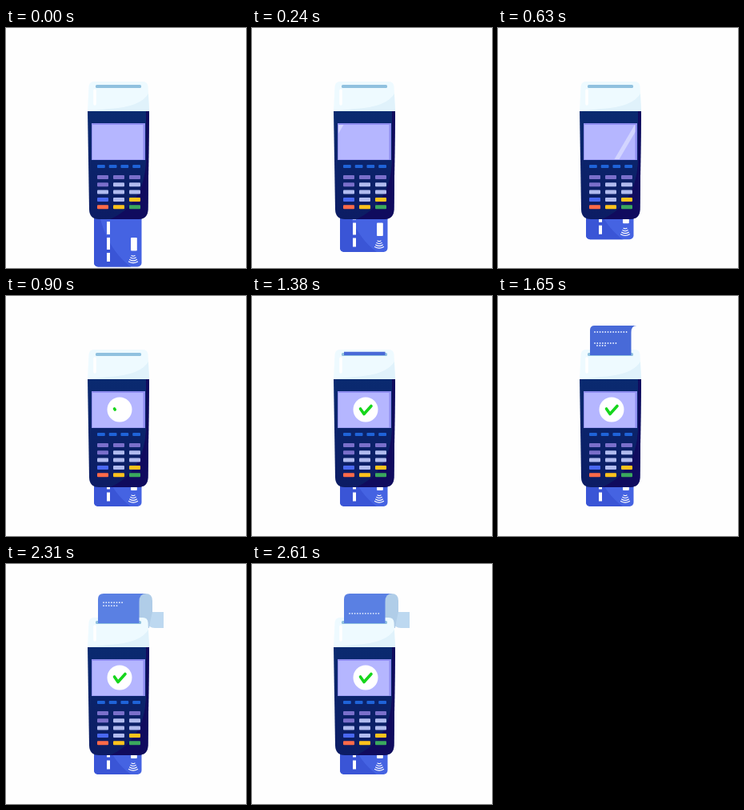
Write an HTML page that moves like this. It is 300 by 300 pixels and loops after 3.51 s.

```html
<!DOCTYPE html>
<html lang="en">
<head>
<meta charset="utf-8">
<title>Card payment</title>
<style>
  html, body { margin: 0; width: 100%; height: 100%; overflow: hidden; background: #fefefe; }
  svg { display: block; width: 100vw; height: 100vh; }
</style>
</head>
<body>
<svg viewBox="0 0 300 300">
  <defs>
    <linearGradient id="navy" x2="0" y2="1">
      <stop stop-color="#0a2a70"/><stop offset="1" stop-color="#0c1c64"/>
    </linearGradient>
    <path id="shell" d="M102 104H179L177.5 227Q177 239 165 239H116Q104.500 239 104 227Z"/>
    <path id="lid" d="M102 104L103.500 73Q104 67 110 67H171Q177 67 177.500 73L179 104Z"/>
    <rect id="plate" x="110" y="180" width="59.500" height="118.500" rx="5"/>
    <clipPath id="inShell"><use href="#shell"/></clipPath>
    <clipPath id="inLid"><use href="#lid"/></clipPath>
    <clipPath id="inPlate"><use href="#plate"/></clipPath>
    <clipPath id="inScreen"><rect x="108" y="121" width="63.500" height="43.500"/></clipPath>
    <clipPath id="aboveSlot"><rect x="100" width="100" height="74"/></clipPath>
    <clipPath id="inPaper"><path id="paperClip"/></clipPath>
  </defs>

  <g id="card">
    <use href="#plate" fill="#4563e2"/>
    <path clip-path="url(#inPlate)" fill="#3a55d6" d="M110 180Q112 268 158 300H110Z"/>
    <path stroke="#fff" stroke-width="4" d="M128 242V258M128 262V277M128 281V292"/>
    <rect x="156" y="262" width="7.800" height="16.500" rx="1" fill="#fff"/>
    <path fill="none" stroke="#fff" stroke-width="1.200" stroke-linecap="round"
      d="M157 284.500q2 1.200 4 0M155.800 287q3.200 2 6.400 0M154.600 289.500q4.400 2.800 8.800 0M153.500 292q5.500 3.400 11 0"/>
  </g>

  <path id="tail" fill="#bdd8f0"/>
  <path id="back" fill="#b0cde8"/>

  <use href="#lid" fill="#eefaff"/>
  <path clip-path="url(#inLid)" fill="#e0f2fb" d="M180 78Q172 99 128 101L102 104H180Z"/>
  <path stroke="#fff" stroke-width="3.500" stroke-linecap="round" d="M111 78V95"/>
  <rect x="112" y="71" width="57" height="4" rx="1.500" fill="#90c1df"/>

  <use href="#shell" fill="url(#navy)"/>
  <path clip-path="url(#inShell)" fill="#100b5e" d="M180 104H175V168Q172 222 128 240H180Z"/>
  <rect x="107" y="119" width="67" height="46" fill="#8f8df0"/>
  <rect x="108" y="121" width="63.500" height="43.500" fill="#b5b6ff"/>
  <g clip-path="url(#inScreen)">
    <path id="shine" fill="#d2d4ff" d="M119 120H125L99 164H93ZM147 120H160L134 165H121Z"/>
  </g>
  <g id="keys"></g>

  <circle id="disc" cx="142" cy="142" fill="#fff"/>
  <path id="tick" d="M135.500 141L140 147.500L149 137.500" pathLength="100" fill="none"
    stroke="#16d61c" stroke-width="3.600" stroke-linecap="round" stroke-linejoin="round"/>

  <g clip-path="url(#aboveSlot)">
    <path id="paper"/>
    <g clip-path="url(#inPaper)">
      <g id="lines" stroke="#e6eeff" stroke-width="1.800" stroke-linecap="round" stroke-dasharray="0 3.300"></g>
    </g>
  </g>
</svg>
<script>
const STEP = 30, END = 2610, LOOP = 3510;
const FEED = 0.121;                       // paper speed, px per ms
const el = id => document.getElementById(id);
const set = (id, name, value) => el(id).setAttribute(name, value);
const ramp = (t, from, to) => Math.min(1, Math.max(0, (t - from) / (to - from)));
const easeOut = u => 1 - (1 - u) ** 2;
const mix = (a, b, u) => a + (b - a) * u;

const key = (x, y, w, h, fill) =>
  `<rect x="${x}" y="${y}" width="${w}" height="${h}" rx="1" fill="${fill}"/>`;
const keyColors = { p: '#7a6fca', l: '#b1bbef', b: '#4a68f0', y: '#ffc21c', r: '#ff6a48', g: '#3aa85e' };
el('keys').innerHTML =
  [114, 128.7, 143.4, 158.2].map(x => key(x, 171, 9.8, 4, '#1f63d8')).join('') +
  [...'pppplllllblyryg'].map((c, i) =>
    key(114 + i % 3 * 20, 184 + Math.floor(i / 3) * 9.3, 14, 5, keyColors[c])).join('');

// receipt rows: start x, end x, y when the paper is fully raised
el('lines').innerHTML = [
  [121, 162, 45], [121, 148, 59], [124, 135, 62], [121, 140, 83], [126, 149, 87],
  [122, 136, 104], [122, 145, 108], [122, 148, 128], [122, 140, 132], [122, 161, 178]
].map(([a, b, y]) => `<path d="M${a} ${y}H${b}"/>`).join('');

function draw(t) {
  set('card', 'transform', `translate(0 ${-35.5 * easeOut(ramp(t, 0, 780))})`);
  set('shine', 'transform', `translate(${(t - 420) * 0.25} 0)`);

  set('disc', 'r', 15.5 * easeOut(ramp(t, 660, 840)));
  const drawn = 100 * ramp(t, 880, 1200);
  set('tick', 'stroke-dasharray', `${drawn} 200`);
  set('tick', 'visibility', drawn ? 'visible' : 'hidden');

  const top = Math.max(37, 37 + (1650 - t) * FEED);
  const bend = ramp(t, 1500, 1680), left = 7 * bend, hook = 166.5 + 8.5 * bend;
  const shape = `M115 150V${top + left}Q115 ${top} ${115 + left} ${top}H${hook}` +
    `Q166.500 ${top} 166.500 ${top + 10 * bend}V150Z`;
  const tone = ramp(t, 1650, 2040);
  set('paper', 'd', shape);
  set('paper', 'fill', `rgb(${mix(72, 90, tone)},${mix(106, 128, tone)},${mix(216, 227, tone)})`);
  set('paperClip', 'd', shape);
  set('lines', 'transform', `translate(0 ${(1650 - t) * FEED})`);

  const fall = 43 * ramp(t, 1650, 2034), curl = ramp(t, 2034, 2160);
  const low = 37 + fall, round = Math.min(9, fall);
  set('back', 'd', fall ? `M166 ${low}V${37 + round}Q166.500 37 174.500 37Q183 37 183 ${37 + round}` +
    `V${low - 20 * curl}Q${183 - 3 * curl} ${low - 8 * curl} ${183 - 4 * curl} ${low}Z` : '');
  set('tail', 'd', curl ? `M176 60H${183 + 14 * curl}V80H186Q178 80 176 72Z` : '');
}

function frame(now) {
  const t = now % LOOP;
  draw(Math.min(END, Math.floor(t / STEP) * STEP));
  requestAnimationFrame(frame);
}
draw(0);
requestAnimationFrame(frame);
</script>
</body>
</html>
```
